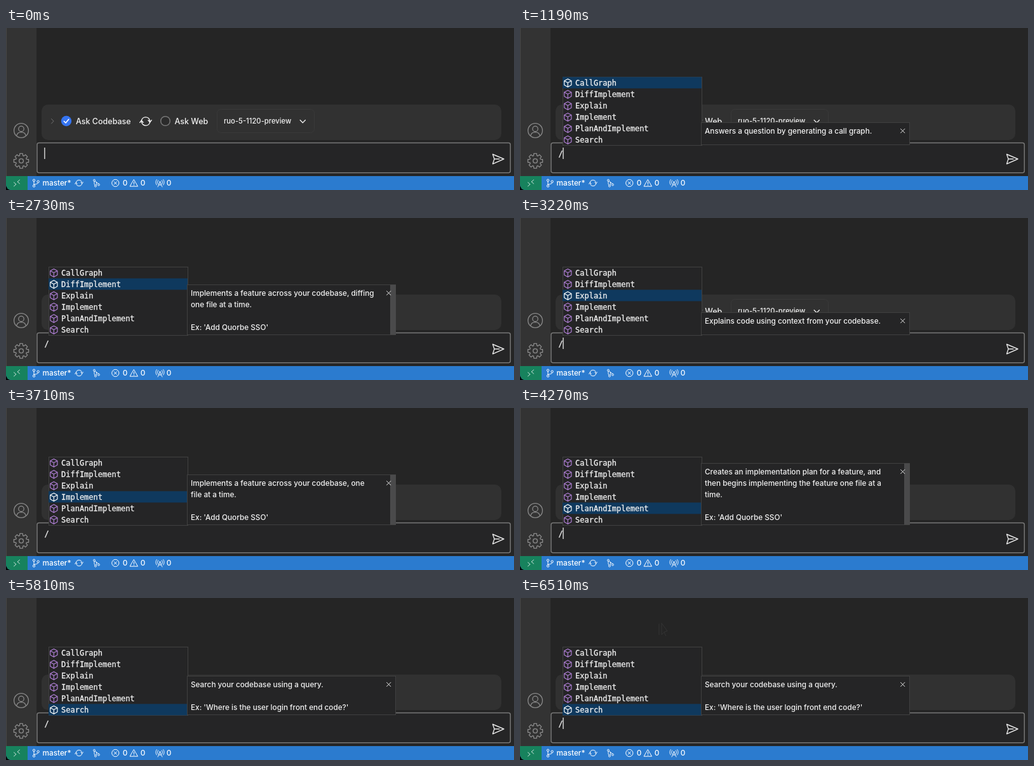
An HTML page that plays this animation: 800x256 px, repeating every 6580 ms.

```html
<!DOCTYPE html>
<html lang="en">
<head>
<meta charset="utf-8">
<title>Slash commands</title>
<style>
  html, body { margin: 0; width: 100%; height: 100%; overflow: hidden; background: #000; }
  svg { display: block; width: 800px; height: 256px; }
  text { font-family: Inter, "Open Sans", sans-serif; fill: #f2f2f2; white-space: pre; }
  .mono { font: 12px "DejaVu Sans Mono", monospace; stroke: #f2f2f2; stroke-width: 0.3px; }
  .row { font-size: 12.5px; font-weight: 500; }
  .model { font-size: 11.25px; font-weight: 500; }
  .status { font-size: 11.8px; font-weight: 500; fill: #fff; }
  .tip { font-size: 11.75px; font-weight: 500; }
  .line { fill: none; stroke-linecap: round; stroke-linejoin: round; }
</style>
</head>
<body>
<svg id="stage" viewBox="0 0 800 256" xmlns="http://www.w3.org/2000/svg"></svg>
<script>
const LOOP = 6580;
const stage = document.getElementById('stage');
const commands = ['CallGraph', 'DiffImplement', 'Explain', 'Implement', 'PlanAndImplement', 'Search'];
const example = "Ex: 'Add Quorbe SSO'";
const tips = [
  ['Answers a question by generating a call graph.'],
  ['Implements a feature across your codebase, diffing', 'one file at a time.', '', example],
  ['Explains code using context from your codebase.'],
  ['Implements a feature across your codebase, one', 'file at a time.', '', example],
  ['Creates an implementation plan for a feature, and', 'then begins implementing the feature one file at a', 'time.', '', example],
  ['Search your codebase using a query.', '', "Ex: 'Where is the user login front end code?'"]
];

const rect = (x, y, w, h, fill, extra = '') =>
  `<rect x="${x}" y="${y}" width="${w}" height="${h}" fill="${fill}" ${extra}/>`;
const line = (d, color, width = 1.2, extra = '') =>
  `<path class="line" d="${d}" stroke="${color}" stroke-width="${width}" ${extra}/>`;
const ring = (x, y, r, color, width = 1.2, fill = 'none') =>
  `<circle cx="${x}" cy="${y}" r="${r}" stroke="${color}" stroke-width="${width}" fill="${fill}"/>`;
const text = (x, y, cls, str) => `<text x="${x}" y="${y}" class="${cls}">${str}</text>`;
const at = (x, y, body) => `<g transform="translate(${x} ${y})">${body}</g>`;

function gear(r) {
  const points = [];
  for (let i = 0; i < 8; i++) {
    [[-0.3, 0.74], [-0.19, 1], [0.19, 1], [0.3, 0.74]].forEach(([da, k]) => {
      const a = i * Math.PI / 4 + da;
      points.push((r * k * Math.cos(a)).toFixed(2) + ' ' + (r * k * Math.sin(a)).toFixed(2));
    });
  }
  return 'M' + points.join('L') + 'Z';
}

function sync(x, y, s, width) {
  const half = line('M-6.5 -1A6.5 6.5 0 0 1 6.3 -1.2M3.8 -1.6L6.6 1.2L9 -1.8', '#fff', width / s);
  return `<g transform="translate(${x} ${y}) scale(${s})">${half}<g transform="rotate(180)">${half}</g></g>`;
}

function sidebar() {
  const gray = '#8a8a8a';
  return rect(0, 0, 48, 234, '#333') + rect(0, 0, 1, 234, '#484848') +
    at(24, 162, ring(0, 0, 11.4, gray, 1.3) + ring(0, -2.6, 4.2, gray, 1.3) +
      line('M-7.2 8.2C-6 0.7 6 0.7 7.2 8.2', gray, 1.3)) +
    at(24, 210, line(gear(11.8), gray, 1.3) + ring(0, 0, 3.4, gray, 1.3));
}

function options() {
  return rect(56, 121, 724, 56, '#313131', 'rx="10"') +
    line('M71.5 143.5L75 147.2L71.5 151', '#707070', 1) +
    ring(95, 147, 8.2, '#3574f0', 0, '#3574f0') + line('M91.3 147.3L94 150L98.8 144.3', '#fff', 1.6) +
    text(110, 151.6, 'row', 'Ask Codebase') + sync(220, 147.5, 1.02, 1.4) +
    ring(251, 147, 7.3, '#777', 1.5, '#2b2b2b') + text(265.5, 151.6, 'row', 'Ask Web') +
    rect(332.5, 128.5, 153, 37, 'none', 'rx="6" stroke="#393939"') +
    text(343, 151.2, 'model', 'ruo-5-1120-preview') + line('M463.2 145.5L467.3 149.7L471.4 145.5', '#eee', 1.3);
}

function statusBar() {
  const w = '#fff';
  const tower = line('M0 -1L-3.5 6M0 -1L3.5 6M-2 3H2M-3 -4.2A4.6 4.6 0 0 0 -3 1.6M3 -4.2A4.6 4.6 0 0 1 3 1.6' +
    'M-5.2 -5.5A7.4 7.4 0 0 0 -5.2 3M5.2 -5.5A7.4 7.4 0 0 1 5.2 3', w, 0.9) + ring(0, -1.6, 0.9, w, 0.9);
  return rect(0, 234, 800, 22, '#2b7bcf') + rect(0, 234, 34, 22, '#17825d') +
    at(17, 245, line('M-4.6 -1L-1 2L-4.6 5M4.6 -5L1 -2L4.6 1', '#d5e9e1', 0.9)) +
    at(47, 245, ring(-3, -4.3, 1.7, w, 1) + ring(-3, 4.6, 1.7, w, 1) + ring(3.6, -2.3, 1.7, w, 1) +
      line('M-3 -2.5V2.8M3.6 -0.5C3.6 2 -0.5 1 -2.8 2.8', w, 1)) +
    text(57.5, 249, 'status', 'master*') + sync(115, 245, 0.72, 1) +
    at(142, 245, ring(-3, -4.3, 1.5, w, 0.9) + ring(-1, 4.6, 1.5, w, 0.9) + ring(4, 2.6, 1.5, w, 0.9) +
      line('M-3 -2.7V1.5L-1.8 3.4M-1.8 -3.2L3.5 1.1M0.4 -1.4V3', w, 0.9)) +
    at(172.3, 245, ring(0, 0, 5.6, w, 1) + line('M-2.2 -2.2L2.2 2.2M2.2 -2.2L-2.2 2.2', w, 1)) +
    text(183.8, 249, 'status', '0') +
    at(201.5, 245, line('M0 -5.2L6 5.2H-6ZM0 -1.6V1.7M0 3.4V3.6', w, 1)) +
    text(211.8, 249, 'status', '0') + at(242.5, 245, tower) + text(252.8, 249, 'status', '0');
}

const cube = color =>
  line('M0 -6.4L5.6 -3.3V3.3L0 6.4L-5.6 3.3V-3.3ZM-5.6 -3.3L0 -0.2L5.6 -3.3M0 -0.2V6.4', color, 1.15);

function menu(sel) {
  return rect(67.5, 77.5, 219, 108, '#252526', 'stroke="#414141"') +
    rect(67, 77.4 + sel * 18, 219, 18, '#0f395e') +
    commands.map((name, i) =>
      at(75.3, 86.8 + i * 18, cube(i === sel ? '#fff' : '#b180d7')) +
      text(87, 91 + i * 18, 'mono', name)).join('');
}

function tip(i) {
  const lines = tips[i];
  const first = lines.length > 1 ? 172 - (lines.length - 1) * 18 : 162;
  const top = first - 12.5;
  return rect(285.5, top, 328, 184.5 - top, '#252526', 'stroke="#404040"') +
    (lines.length > 3 ? rect(605, top, 9, 184.5 - top, '#4a4a4b') : '') +
    lines.map((s, n) => text(291, first + 4.8 + n * 18, 'tip', s)).join('') +
    at(602.7, first + 0.6, line('M-3.2 -3.2L3.2 3.2M3.2 -3.2L-3.2 3.2', '#e4e4e4', 1));
}

stage.innerHTML =
  '<clipPath id="window"><path d="M0 0H800V256H10Q0 256 0 246Z"/></clipPath><g clip-path="url(#window)">' +
  rect(0, 0, 800, 256, '#252525') + sidebar() + options() +
  rect(49, 181.5, 745.3, 47.3, '#252526', 'rx="3" stroke="#777" stroke-width="1.5"') +
  '<text id="slash" class="mono" x="60.6" y="203">/</text>' +
  rect(60, 189, 1.7, 18, '#bdbdbd', 'id="caret"') +
  line('M766.5 199.5L784 207L766.5 214.8L769 207ZM769 207H777', '#e6e6e6', 1.4) +
  statusBar() +
  line('M219 41V58M223 40V58L227 54L229.5 59.5M223 40L232 52L227 54', '#363636', 0.9, 'id="pointer"') +
  '</g><g id="menu"></g><g id="tip"></g>';

const el = id => document.getElementById(id);
const ui = { slash: el('slash'), caret: el('caret'), pointer: el('pointer'), menu: el('menu'), tip: el('tip') };

const picks = [1050, 2310, 2940, 3430, 3990, 4410];
const tipTimes = picks.map(t => t + 70);
const blinks = [280, 910, 1540, 2030, 2520, 3080, 3570, 4060, 4550, 5180, 5670, 6160];
const passed = (times, t) => times.filter(x => x <= t).length;
const show = (node, on) => node.setAttribute('visibility', on ? 'visible' : 'hidden');

const last = {};
function fill(key, index, draw) {
  if (last[key] === index) return;
  last[key] = index;
  ui[key].innerHTML = index < 0 ? '' : draw(index);
}

function render(t) {
  const typed = t >= 980;
  show(ui.slash, typed);
  show(ui.caret, passed(blinks, t) % 2 === 0);
  ui.caret.setAttribute('x', typed ? 67.2 : 60);
  show(ui.pointer, t >= 6090);
  fill('menu', passed(picks, t) - 1, menu);
  fill('tip', passed(tipTimes, t) - 1, tip);
}

const start = performance.now();
function tick() {
  render((performance.now() - start) % LOOP);
  requestAnimationFrame(tick);
}
tick();
</script>
</body>
</html>
```
